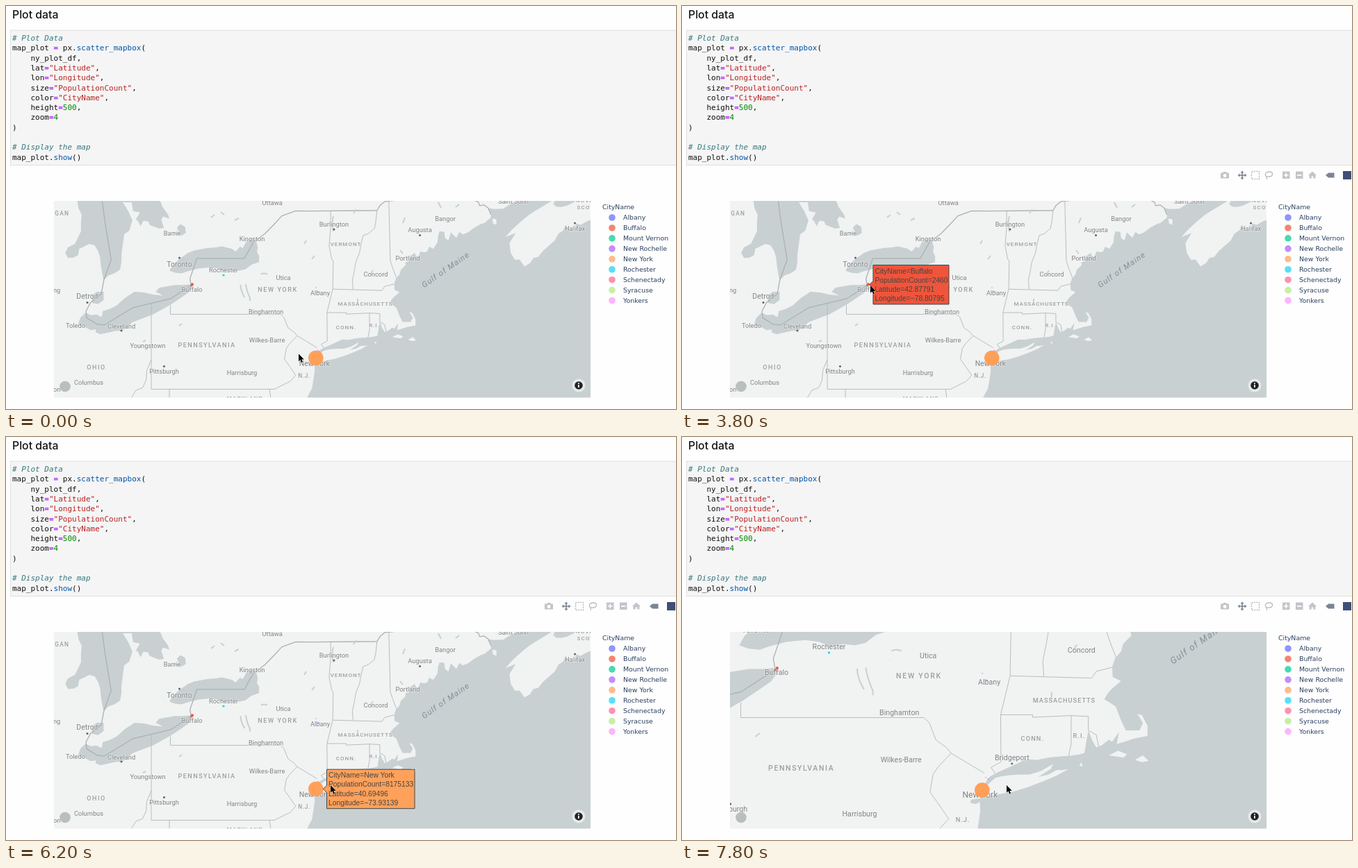
An HTML page that plays this animation: 964x581 px, repeating every 8 s.

```html
<!DOCTYPE html>
<html lang="en">
<head>
<meta charset="utf-8">
<title>Plot data</title>
<style>
html, body { margin: 0; width: 100%; height: 100%; overflow: hidden; background: #fefefe; }
svg { display: block; }
text { white-space: pre; }
#code { font: 11px "DejaVu Sans Mono", monospace; fill: #111; }
.c { fill: #36797f; font-style: italic; }
.o { fill: #a2f; font-weight: bold; }
.s { fill: #ba2121; }
.n { fill: #080; }
.p { fill: #05a; }
#legend { font: 9.4px "DejaVu Sans", sans-serif; fill: #2a3f5f; }
#tip { font: 10.3px "Liberation Sans", Arial, sans-serif; fill: #444; }
#labels { font-family: Roboto, sans-serif; text-anchor: middle; dominant-baseline: central; paint-order: stroke; stroke: #f3f4f4; stroke-opacity: .7; stroke-width: 1.4px; stroke-linejoin: round; }
.city { fill: #808485; }
.state { fill: #9b9fa0; font-weight: 500; }
.sea { fill: #839094; font-style: italic; stroke: none; }
#world path { vector-effect: non-scaling-stroke; stroke-linejoin: round; }
.water { fill: #c8d0d2; }
.land { fill: #f1f2f2; }
.line { fill: none; stroke: #b9bdbe; stroke-width: 1; }
.border { fill: none; stroke: #adb1b2; stroke-width: 1.3; }
.pond { fill: none; stroke: #c8d0d2; stroke-width: 2; }
</style>
</head>
<body>
<svg id="stage" width="964" height="581" viewBox="0 0 964 581">
  <rect width="964" height="581" fill="#fefefe"/>
  <text x="9" y="18" font-family="Inter, sans-serif" font-size="15.8" font-weight="500" fill="#151515">Plot data</text>
  <rect x="6.5" y="35" width="970" height="194.5" fill="#f5f5f5" stroke="#e0e0e0"/>
  <g id="code"></g>

  <g id="modebar" fill="#c2c5ca">
    <path fill-rule="evenodd" d="M775 240.5h3l1-1.5h4l1 1.5h3v8h-12zM781 242a2.5 2.5 0 1 0 .1 0z"/>
    <path fill="#7b8492" d="M806 237.5l2.500 3h-1.700v2.700h2.700v-1.700l3 2.500-3 2.500v-1.700h-2.700v2.700h1.700l-2.500 3-2.500-3h1.700v-2.700h-2.700v1.700l-3-2.500 3-2.500v1.700h2.700v-2.700h-1.700z"/>
    <rect x="819.5" y="238.5" width="11" height="11" fill="none" stroke="#b8bcc2" stroke-width="1.5" stroke-dasharray="2 1.4"/>
    <path fill="none" stroke="#b8bcc2" stroke-width="1.3" d="M841 246c-3-2-2-7 4-7 6 0 6 6 0 7-3 .5-5-1-4 1s1 2 0 3"/>
    <path fill-rule="evenodd" d="M864 238.5h10.500v10.500h-10.500zM868.400 240.500v2.400h-2.400v1.700h2.400v2.400h1.700v-2.400h2.400v-1.700h-2.400v-2.400z"/>
    <path fill-rule="evenodd" d="M883 238.5h10.500v10.500h-10.500zM885 243v1.700h6.500v-1.700z"/>
    <path d="M907 238.5l6 5.500h-1.500v4.500h-3.200v-3h-2.600v3h-3.200v-4.500h-1.500z"/>
    <path fill="#7b8492" d="M926 244l4-3.500h8.500v7h-8.500z"/>
    <rect x="951" y="238" width="12" height="12" fill="#3f4f75"/>
  </g>

  <svg x="69" y="281" width="772" height="283.5" viewBox="69 281 772 283.5">
    <rect class="land" x="69" y="281" width="772" height="284"/>
    <g id="world">
      <g transform="translate(6.3 5.75) scale(.9863)">
        <!-- Atlantic coast -->
        <path class="water" d="M432 568L440 553 442 541 444 527 443.600 519 440 521 435 520 436 517 444 516 445 510 448 503 452 497 458 493.600 466 490 475 486 484 481.500 494 482 504 480 514 479 522 478.500 530 477.500 535.600 476 537 467 539 456 542 464 546 471 551 469 557 464.300 560 466 566 457.500 564 468 571 466 579 463.300 591 461 591 452 586 442.500 581.600 441.500 583 443 587 449.700 584 456 572 456 567.700 447 563 435 557 431 553 428.500 556 423.500 559 420 567.700 412.500 560.400 409 560 400 563 391H852V568z"/>
        <!-- Gulf of Maine -->
        <path class="water" d="M563 392L567.700 386.500 569.500 380 576.800 372.500 576 369 582 367 582 361 589.600 355 592 360 595.500 360 598 353 604 354 608 353 611 346 617 349 623 340 624 330 626 323.500 633 324.500 634 333 639 337 642.500 325 650.600 333 655 324.500 660 328 667 325.500 677 318 686 313 692 311 701 303.500 701 296.500 697 289.500 705 291 719 290.500 726 286 734 281 742 275H852V392z"/>
        <!-- Nova Scotia and the islands -->
        <path class="land" d="M722 332L732 321 745 309 757 299 770 291 788 280 796 275 792 284 796 287.500 803 288 812 286 822 281 830 275H852V305L841 309 832 314 825 312 824 322 816 322 810 314 807 322 799.500 327 794 337 785 345 777 352 770 361 763 362.500 758 370 750 375 743 365 736 365 730 355 728 341 737 326z"/>
        <path class="land" d="M703 305L709 306 709 314 704 312zM557 478L565 474 573 477 570 480zM580 482L587 478 592 483 586 484zM531 487l2-3 1 4z"/>
        <path class="land" d="M446 514L448 507 451.600 503 457 498 462.600 496.500 470 495.500 477.600 495 487 495 497 492 508 485.700 506 490 495 497 504 495 511 491 516 491 521.700 490 511 496 499 501 486 506 473 510 462 512 452 514z"/>
        <!-- Lake Ontario -->
        <path class="water" d="M232 381L236.600 373 247 363.500 259 355 268 351.500 287 348 300 347 308.600 345.500 323 349 328.600 353 335 346 339 348 345 337 352 334 358.600 338 361 347 359.700 353.500 363 360 362.600 368.500 352 372 343 379 334 381 323 380 312 382 302 378 290 376.500 274 378 258.500 382 250 385 240 384z"/>
        <!-- Lake Erie -->
        <path class="water" d="M98.700 459.500L102 450 109.600 442.500 117.600 446 126 445 133 449 135 440 145 437 155 432 167 421 181 412 195 413 208 416 223 417.500 212 412 217 406 228 404 240 402 252 402 263.700 401 267 403 260 413 249 420.500 235 430 221.700 437.500 208 445 195 450 178 456.500 170 464 162.600 469 154 469 145 471 131.500 474 124 471 125 467 117 468 108 463z"/>
        <!-- Lake Huron and Georgian Bay -->
        <path class="water" d="M97 275L99.500 290 104 299 103 312 103 323.500 99 332 94 342 84 347 80 355 84 362.500 92 362 98.700 358.500 100.500 349 105 347 115 342 123 344 128 352.500 131 362 132 373.500 134 385 136 395 143 388 151.600 385 160 379.500 162 368 162 357.500 165 335.500 166 328 173.500 322.500 178 307.500 172 294 164 281 177 281 179 294 189 296 183 306.500 186 308 190 316 194 308 201 309 203 314 216.600 319.500 224 318.500 220 306.500 223 302 232 305 230 299 222 288 217 275z"/>
        <path class="water" d="M119 428L119 418 126 412 136 412 136 424 128 430zM239 329L239 325 246 325 243 318 248 313 255 317 256 326 249 330 245 327z"/>
        <!-- State lines -->
        <path class="line" d="M233.400 431.500V444.800H394.300L399 449 405 464.400 414 471 418.400 476.200 447.300 493.600M418.400 476.200L407 488 402.400 495 399.800 510.500 408 522 416.200 534 408 543 399.800 547 385 554.300M205.600 429V554.300H385M205.600 511L199 527 198 541 193 552 183 556 176 568M232 554.300V568M378 554.300L380 568"/>
        <path class="line" d="M467.300 293L467 320 465 345 469 365 471 366.500 470.200 408 461.900 442.300 462.200 483.800 453.500 488.700 457 494M470.200 408L542 410 546 404 560 400.500M461.900 442.300L490 442.300 490 444.500 523.900 443 539 443.800 539 456 546 460 548 470M523.900 443V468L521.700 478.500M534.900 293L533 310 531 319.500 522 327 514.800 329.500 512 340 509.300 355 504 368 502 380 499 395 499.800 408.500M552 275L554.200 366.500 558 378 563 391"/>
        <path class="border" d="M133.400 275L138 310 147 365 136.300 395 132.600 415 117 427.500 110.300 440 111.400 450 126.800 459.500 137 460.500 179 435 233.800 422 263.700 402.500 262 392.700 266 381 272 363H341.400L354.200 340 371.300 327 384 314 396 301 416.200 293.700 440 294 534.900 293 539 286 546 280 566 278M670 275L683 281 684.500 286 691 285 697 289.500 701 299"/>
      </g>
      <path class="pond" d="M471 303q-3 10 0 22M337.400 402q0 8 6 18M345 401q1 9 6 20v4M367 386.500q4-2 9 0M500 299l4-6M524 387l4-6M567 352l4 5M571 313l3-8M622 283l4 8M647 290l5-4M295 305l5-4M309 297l5 4M329 309l6-3M429 343l3-5M440 365l4-5M506 422v7M249 461l4-3M197 484l4-2"/>
    </g>
    <g id="labels"></g>
    <g id="dots"></g>
    <circle cx="85" cy="548.5" r="7.8" fill="#b9bebe"/>
    <circle cx="824" cy="547" r="9.5" fill="#fff" fill-opacity=".55"/>
    <circle cx="824" cy="547" r="5.8" fill="#222"/>
    <path d="M823 546h1.700v4h-1.700zM823 543.200h1.700v1.700h-1.700z" fill="#fff"/>
  </svg>

  <g id="legend"><text x="858" y="293.3">CityName</text></g>
  <g id="tip"></g>
  <path id="cursor" d="M0 0V10.800L2.500 8.600 4.200 12.500 6 11.700 4.400 8H7.800z" fill="#000" stroke="#fff" stroke-width=".8" paint-order="stroke"/>
</svg>
<script>
const $ = id => document.getElementById(id);
function add(parent, tag, attrs, text) {
  const el = document.createElementNS('http://www.w3.org/2000/svg', tag);
  for (const key in attrs) el.setAttribute(key, attrs[key]);
  if (text !== undefined) el.textContent = text;
  return parent.appendChild(el);
}

// Code cell: {class text} marks a coloured run.
const code = `{c# Plot Data}
map_plot {o=} px.{pscatter_mapbox}(
    ny_plot_df,
    lat{o=}{s"Latitude"},
    lon{o=}{s"Longitude"},
    size{o=}{s"PopulationCount"},
    color{o=}{s"CityName"},
    height{o=}{n500},
    zoom{o=}{n4}
)

{c# Display the map}
map_plot.{pshow}()`;
code.split('\n').forEach((line, i) => {
  const row = add($('code'), 'text', { x: 9, y: 50 + i * 14.3 });
  for (const run of line.match(/\{.[^}]*\}|[^{]+/g) || []) {
    const marked = run[0] === '{';
    add(row, 'tspan', marked ? { class: run[1] } : {}, marked ? run.slice(2, -1) : run);
  }
});

const palette = {
  Albany: '#636efa', Buffalo: '#ef553b', 'Mount Vernon': '#00cc96', 'New Rochelle': '#ab63fa',
  'New York': '#ffa15a', Rochester: '#19d3f3', Schenectady: '#ff6692', Syracuse: '#b6e880', Yonkers: '#ff97ff'
};
Object.entries(palette).forEach(([name, fill], i) => {
  const y = 305 + i * 14.95;
  add($('legend'), 'circle', { cx: 872, cy: y, r: 4.8, fill, 'fill-opacity': .72 });
  add($('legend'), 'text', { x: 888, y: y + 3.4 }, name);
});

// Map items keep their size in pixels while their anchors follow the zoom.
const items = [];
const place = (el, x, y, opts = {}) => items.push({ el, x, y, dy: 0, grow: 0, turn: 0, min: 0, max: 9, ...opts });
const label = (text, cls, size, x, y, opts = {}) => place(
  add($('labels'), 'text', { class: cls, 'font-size': size, 'letter-spacing': opts.track || 0 }, text), x, y, { grow: .22, ...opts });
const dot = (x, y, r, fill, opts) => place(add($('dots'), 'circle', { r, fill }), x, y, opts);

const towns = [
  ['Ottawa', 383, 283], ['Saint John', 730, 281], ['Barrie', 239, 327], ['Kingston', 354, 335],
  ['Bangor', 632, 306], ['Portland', 578, 363], ['Concord', 532, 386], ['Utica', 399, 391],
  ['Albany', 452, 413.5], ['Binghamton', 374, 440.5], ['Wilkes-Barre', 375.5, 481], ['Harrisburg', 339.5, 528],
  ['Youngstown', 204, 489], ['Columbus', 119, 542], ['Toledo', 100, 460.5], ['Lansing', 62, 409.5], ['Dayton', 64, 552]
];
for (const [name, x, y] of towns) label(name, 'city', 9.3, x, y);
label('Canton', 'city', 9.3, 178, 503, { min: 1.2 });
label('Adirondack Park', 'city', 9, 432, 348, { min: 1.2, max: 1.5 });

// name, x, y, label offset, dot shown
const marked = [
  ['Toronto', 249.5, 363, 9, 1], ['Detroit', 117, 427.5, -9, 1], ['Cleveland', 166, 468, -7, 1],
  ['Pittsburgh', 227.5, 519.5, 7, 1], ['Burlington', 472, 322, -8, 1], ['Augusta', 595.5, 330.5, -8, 1],
  ['Halifax', 818.5, 313, 7, 1], ['Rochester', 313, 388, -8, 0], ['Buffalo', 267.5, 401, 7, 0], ['New York', 444, 507, 8, 0]
];
for (const [name, x, y, dy, shown] of marked) {
  label(name, 'city', /Toronto|Detroit|New/.test(name) ? 10.5 : 9.3, x, y, { dy });
  if (shown) dot(x, y, 1.5, '#5f6364');
}
label('Bridgeport', 'city', 9.3, 471.7, 484.5, { dy: -8, min: 1.2 });
dot(471.7, 484.5, 1.4, '#5f6364', { min: 1.2 });

const states = [
  ['NEW YORK', 391, 408, 9.2, 1.5], ['PENNSYLVANIA', 289, 488.5, 9.2, 1.4], ['OHIO', 130, 520.5, 9, 1.5],
  ['VERMONT', 489, 343.5, 8, 1], ['MASSACHUSETTS', 517, 429.5, 8, .9], ['CONN.', 489.5, 463, 8, 1],
  ['R.I.', 530, 460.5, 8, 1], ['N.J.', 429, 533, 8.2, .7], ['MARYLAND', 344, 565, 8, 1.2],
  ['MICHIGAN', 66, 299, 8.4, 1.2], ['NOVA', 833, 280, 8, 1.2], ['SCOTIA', 839, 290.5, 8, 1.2]
];
for (const [name, x, y, size, track] of states) label(name, 'state', size, x, y, { track });
label('N.H.', 'state', 8, 528.5, 362, { min: 1.2, max: 1.4 });
label('Gulf of Maine', 'sea', 11.5, 632.5, 380, { turn: -35, track: 1.1 });

dot(268, 401.3, 2, palette.Buffalo);
dot(266.5, 403, 1.2, palette.Buffalo);
dot(313, 388, 1.6, palette.Rochester);
dot(366, 394, .6, palette.Syracuse);
dot(446, 406, .7, palette.Schenectady);
dot(450, 412, .8, palette.Albany);
dot(449, 496.5, 1, palette.Yonkers);
dot(451, 498, .8, palette['New Rochelle']);
dot(445.8, 507.5, 10.8, '#ff9f58');

// Hover boxes: start, end, box x, box y, width, city, count, latitude, longitude
const hovers = [
  [1000, 2400, 453, 477.3, 109.3, 'New York', '3921', '40.7334', '−73.86272'],
  [3200, 4400, 275, 373.5, 109, 'Buffalo', '2460', '42.87791', '−78.80795'],
  [4800, 5800, 320, 360.5, 109, 'Rochester', '1495', '43.14056', '−77.56198'],
  [6200, 7000, 461.5, 479.2, 126.5, 'New York', '8175133', '40.69496', '−73.93139']
].map(([start, end, x, y, width, city, count, lat, lon]) => {
  const el = add($('tip'), 'g', { transform: `translate(${x} ${y})` });
  add(el, 'path', { d: `M0 0H${width}V56.500H0V33.500L-5.200 28.200 0 23z`, fill: palette[city], stroke: '#444' });
  [`CityName=${city}`, `PopulationCount=${count}`, `Latitude=${lat}`, `Longitude=${lon}`]
    .forEach((row, i) => add(el, 'text', { x: 2.5, y: 12 + i * 13.2 }, row));
  return { el, start, end };
});

const cursorPath = [
  [0, 421, 501.5], [200, 421, 501.5], [1000, 444, 503], [2200, 444, 503], [3200, 271, 403], [4200, 271, 403],
  [4800, 317, 387], [5600, 317, 387], [6200, 467, 502], [8000, 467, 502]
];
const zoomPath = [[0, 1], [6800, 1], [7000, 1.02], [7200, 1.12], [7400, 1.27], [7600, 1.45], [7800, 1.659], [8000, 1.659]];
function sample(path, t) {
  const i = path.findIndex(step => step[0] > t);
  const a = path[i - 1], b = path[i], k = (t - a[0]) / (b[0] - a[0]);
  return a.slice(1).map((v, j) => v + (b[j + 1] - v) * k);
}

const show = (el, on) => { el.style.display = on ? '' : 'none'; };
const pivot = { x: 467, y: 505 };
let drawnZoom = 0;
function drawMap(zoom) {
  if (zoom === drawnZoom) return;
  drawnZoom = zoom;
  const at = (v, axis) => pivot[axis] + (v - pivot[axis]) * zoom;
  $('world').setAttribute('transform', `translate(${at(0, 'x')} ${at(0, 'y')}) scale(${zoom})`);
  for (const m of items) {
    show(m.el, zoom >= m.min && zoom <= m.max);
    m.el.setAttribute('transform',
      `translate(${at(m.x, 'x')} ${at(m.y, 'y') + m.dy}) rotate(${m.turn}) scale(${1 + m.grow * (zoom - 1)})`);
  }
}

function draw() {
  const t = Math.floor(performance.now() % 8000 / 200) * 200;
  drawMap(sample(zoomPath, t)[0]);
  $('cursor').setAttribute('transform', `translate(${sample(cursorPath, t)})`);
  show($('modebar'), t >= 2400);
  for (const h of hovers) show(h.el, t >= h.start && t < h.end);
  requestAnimationFrame(draw);
}
draw();
</script>
</body>
</html>
```
